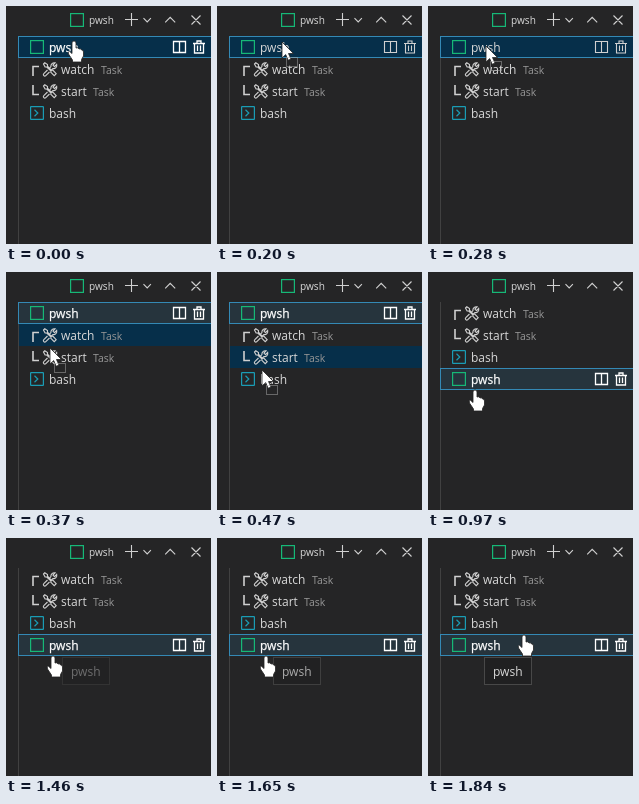
These frames come from a looping animation (205x238 px, 1940 ms). An HTML page:

```html
<!DOCTYPE html>
<html lang="en">
<head>
<meta charset="utf-8">
<title>Terminal tabs</title>
<style>
html, body { margin: 0; width: 100%; height: 100%; overflow: hidden; background: #252526; }
svg { display: block; width: 205px; height: 238px; }
text { font: 12px "Open Sans", "Noto Sans", sans-serif; fill: #d8d8d8; }
.task { font-size: 10.5px; fill: #969696; }
.head { font-size: 10.1px; }
.line { fill: none; stroke: #d0d0d0; stroke-width: 1.1; }
.green { fill: none; stroke: #16b877; stroke-width: 1.2; }
.cyan { fill: none; stroke: #1a9cb4; stroke-width: 1.2; }
.hot text { fill: #fff; stroke: #fff; stroke-width: .25; }
.hot .line { stroke: #fff; stroke-width: 1.3; }
</style>
</head>
<body>
<svg viewBox="0 0 205 238">
  <defs>
    <g id="tools" class="line">
      <path d="M5 8 1.3 11.7a1.2 1.2 0 0 0 2 2L7 10M7 6.2 8.4 4.6a3.4 3.4 0 0 1 4.2-3.8L10.4 3l1.6 1.6 2.2-2.2a3.4 3.4 0 0 1-3.8 4.2L8.7 8.2"/>
      <path d="M1 2 2.3.8 5 2.6v1.6L9 8.4l1.2-.4 3.5 3.7-2 2L8.2 10.2l.4-1.2L4.2 5H2.6z"/>
    </g>
  </defs>
  <rect width="205" height="238" fill="#252526"/>
  <path d="M12.5 30V238" stroke="#414141"/>

  <rect class="green" x="64.6" y="7.6" width="12.8" height="12.8"/>
  <text class="head" x="83" y="18">pwsh</text>
  <path class="line" d="M119 13.5h13M125.5 7v13M137.5 12.2l3.7 3.7 3.7-3.7M159.2 16.3l5-5 5 5M185.5 9.5l9 9M194.5 9.5l-9 9"/>

  <rect id="drop" x="13" width="192" height="22" fill="#062f4a"/>
  <g id="tasks">
    <path d="M27 70V60.5h6M27 79v9.5h6" fill="none" stroke="#d0d0d0" stroke-width="1.6"/>
    <use href="#tools" x="36.5" y="56"/>
    <use href="#tools" x="36.5" y="78"/>
    <text x="55" y="68">watch</text><text class="task" x="95" y="68">Task</text>
    <text x="55" y="90">start</text><text class="task" x="87" y="90">Task</text>
  </g>
  <g id="bash">
    <rect class="cyan" x="24.6" y="100.6" width="12.8" height="12.8" rx=".5"/>
    <path class="cyan" d="M28.5 103.8l3.3 3.2-3.3 3.2"/>
    <text x="43" y="112">bash</text>
  </g>
  <g id="pwsh">
    <rect id="sel" x="12.5" y="30.5" width="194" height="21" stroke="#3489b5"/>
    <rect class="green" x="24.6" y="34.6" width="12.8" height="12.8"/>
    <text x="43" y="46">pwsh</text>
    <path class="line" d="M167.5 35.5h12v11h-12zM173.5 35.5v11M187 37.5h12M191 37v-2h4v2M188.5 38v9h9v-9M191.5 39.5v5.5M194.5 39.5v5.5"/>
  </g>

  <g id="tip">
    <rect x="56.5" y="119.5" width="47" height="27" fill="#202021" stroke="#484848"/>
    <text x="65" y="138">pwsh</text>
  </g>
  <g id="arrow">
    <path d="M0 0V16l3.7-3.4 2.5 5.7 2.8-1.2-2.5-5.6h5z" fill="#fff" stroke="#222" stroke-width=".8"/>
    <rect x="4.5" y="15.5" width="11" height="9" fill="none" stroke="#aaa" stroke-dasharray="1 1"/>
  </g>
  <path id="hand" d="M-2 2a2 2 0 0 1 4 0V7Q4.2 6 5 8 6.8 7 7.5 9 9.5 8.8 9.5 11V15L7.5 18.5V21H-1.5V19L-5.5 13Q-6.5 10.5-4.5 10.3L-2 12.5z" fill="#fff" stroke="#222" stroke-width=".8"/>
</svg>
<script>
const LOOP = 1940, ROW = 22;
const $ = id => document.getElementById(id);
const moveTo = (id, x, y) => $(id).setAttribute('transform', `translate(${x} ${y})`);
const show = (id, on) => $(id).style.display = on ? '' : 'none';

// start, pointer, x, y, highlighted row, tooltip opacity
const steps = [
  [0, 'hand', 68, 35, 0, 0],
  [200, 'arrow', 65, 36, 0, 0],
  [280, 'arrow', 58, 40, 0, 0],
  [370, 'arrow', 44, 76, 1, 0],
  [470, 'arrow', 45, 98, 2, 0],
  [570, 'arrow', 47, 118, 3, 0],
  [970, 'hand', 47, 118, -1, 0],
  [1460, 'hand', 47, 118, -1, .4],
  [1560, 'hand', 49, 118, -1, .75],
  [1660, 'hand', 62, 113, -1, 1],
  [1750, 'hand', 81, 104, -1, 1],
  [1840, 'hand', 96, 97, -1, 1]
];
let shown;

function draw(t) {
  const step = steps.findLast(s => s[0] <= t);
  if (step === shown) return;
  shown = step;
  const [start, pointer, x, y, row, tip] = step;
  const moved = start >= 970;
  show('hand', pointer === 'hand');
  show('arrow', pointer === 'arrow');
  moveTo(pointer, x, y);
  show('drop', row >= 0);
  $('drop').setAttribute('y', 30 + ROW * Math.max(row, 0));
  moveTo('tasks', 0, moved ? -ROW : 0);
  moveTo('bash', 0, moved ? -ROW : 0);
  moveTo('pwsh', 0, moved ? 3 * ROW : 0);
  $('sel').setAttribute('fill', row === 0 ? '#062f4a' : '#26343d');
  $('pwsh').setAttribute('class', row === 0 && start > 0 ? '' : 'hot');
  $('tip').style.opacity = tip;
}

function tick() {
  draw(performance.now() % LOOP);
  requestAnimationFrame(tick);
}
tick();
</script>
</body>
</html>
```
